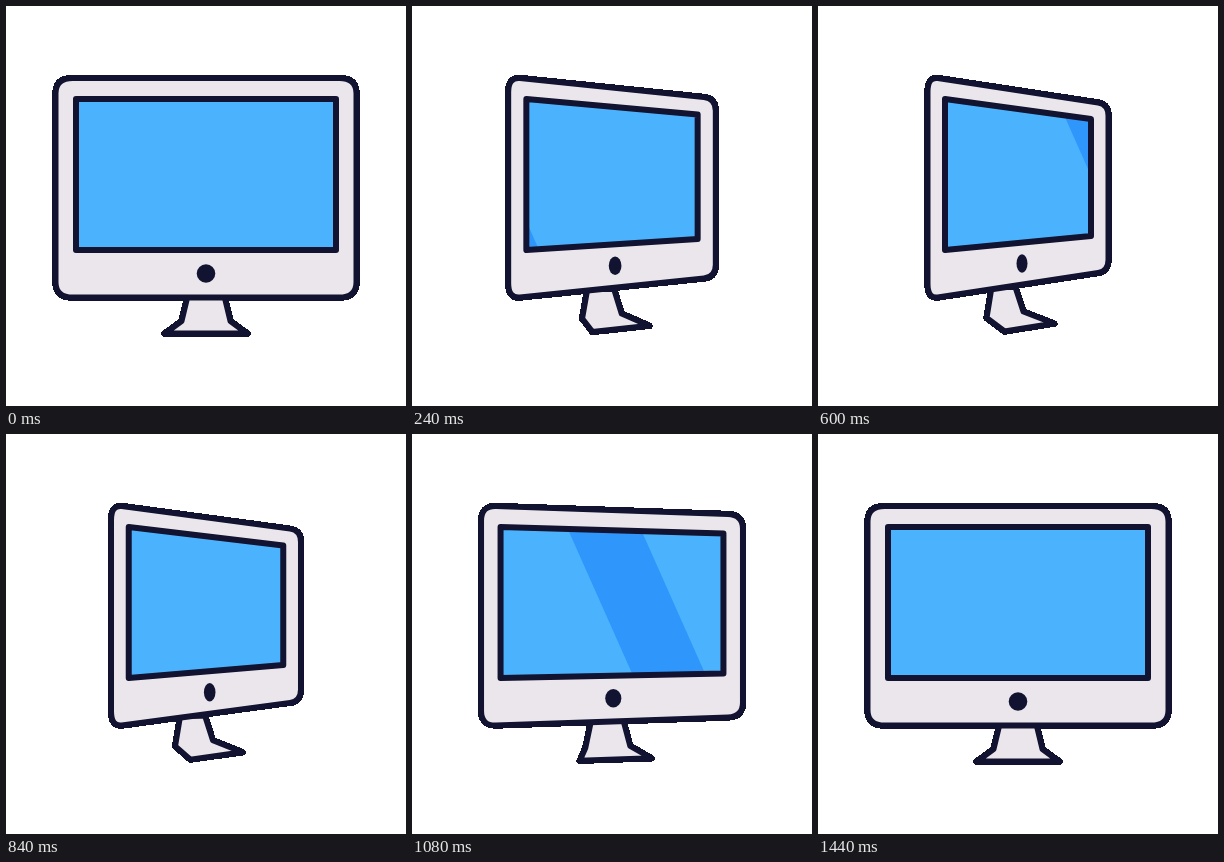
These frames come from a looping animation (400x400 px, 3.62 s). An HTML page:

```html
<!DOCTYPE html>
<html lang="en">
<head>
<meta charset="utf-8">
<title>Turning monitor</title>
<style>
  html, body { margin: 0; width: 100%; height: 100%; overflow: hidden; background: #fff; }
  svg { display: block; width: 100%; height: 100%; }
  .line { stroke: #121331; stroke-width: 6; stroke-linejoin: round; }
  .shell { fill: #ebe6ec; }
</style>
</head>
<body>
<svg viewBox="0 0 400 400">
  <!-- hard outer edge: alpha is either 0 or 1 -->
  <filter id="hard" filterUnits="userSpaceOnUse" width="400" height="400" color-interpolation-filters="sRGB">
    <feComponentTransfer><feFuncA type="discrete" tableValues="0 1 1 1"/></feComponentTransfer>
  </filter>
  <clipPath id="clip"><path id="mask"/></clipPath>
  <g filter="url(#hard)">
    <path id="stand" class="line shell"/>
    <path id="body" class="line shell"/>
    <path id="screen" fill="#4bb3fd"/>
    <g clip-path="url(#clip)"><path id="glare" fill="#2f97fc" d="M-8.9 80h73l80.1 180h-73z"/></g>
    <path id="frame" class="line" fill="none"/>
    <ellipse id="button" fill="#121331"/>
  </g>
</svg>
<script>
const LOOP = 3620, STEP = 30, TURN = 600, GLARE_START = 240;
const el = id => document.getElementById(id);
const mix = (a, b, p) => a + (b - a) * p;
const between = (a, b, f) => [mix(a[0], b[0], f), mix(a[1], b[1], f)];
const set = (id, attrs) => {
  for (const key in attrs) el(id).setAttribute(key, attrs[key]);
};
const polygon = points => "M" + points.join("L") + "Z";

// Corners of a panel whose right side shortens by the given tapers.
const panel = (left, top, bottom, topTaper, bottomTaper) => [
  [left, top], [400 - left, top + topTaper],
  [400 - left, bottom - bottomTaper], [left, bottom]];

// Rounds each corner by a fixed share of the edges that meet there.
function rounded(points) {
  const share = [0.07, 0.057];
  return points.map((pt, i) => {
    const from = between(pt, points[(i + 3) % 4], share[i % 2]);
    const to = between(pt, points[(i + 1) % 4], share[(i + 1) % 2]);
    return `${i ? "L" : "M"}${from}Q${pt} ${to}`;
  }).join("") + "Z";
}

// Each stand corner: x, y, and its shift at full turn.
const stand = [
  [181.5, 290, -8, -9], [175.5, 315, -7, -3], [158.5, 327.5, 28, -2],
  [241.5, 327.5, -5, -10], [224.5, 315, -19, -9.5], [218.5, 290, -21, -9]];

// Cubic Bezier easing (.33, 0, 0, 1)
function ease(t) {
  let lo = 0, hi = 1;
  for (let i = 0; i < 30; i++) {
    const s = (lo + hi) / 2;
    if (0.99 * s * (1 - s) ** 2 + s ** 3 < t) lo = s; else hi = s;
  }
  return lo * lo * (3 - 2 * lo);
}

function draw(t) {
  const p = ease(Math.max(0, 1 - Math.abs(t - TURN) / TURN));

  set("stand", { d: polygon(stand.map(([x, y, dx, dy]) => [x + dx * p, y + dy * p])) });
  set("body", { d: rounded(panel(49.5 + 60 * p, 72 - 1.5 * p, 291.5 + 1.5 * p, 27.5 * p, 27.5 * p)) });
  const face = polygon(panel(70 + 57 * p, 93, 244, 20 * p, 14 * p));
  for (const id of ["mask", "screen", "frame"]) set(id, { d: face });
  set("button", { cx: 200 + 4 * p, cy: 267.5 - 10 * p, rx: 9.3 - 3.8 * p, ry: 9.3 });

  // The glare crosses the screen twice.
  const g = t - GLARE_START;
  const visible = g >= 0 && g < 2 * TURN;
  set("glare", {
    visibility: visible ? "visible" : "hidden",
    transform: `translate(${-10 + g % TURN * 0.7} 0)`
  });
}

const start = performance.now();
function tick() {
  const t = (performance.now() - start) % LOOP;
  draw(Math.floor(t / STEP) * STEP);
  requestAnimationFrame(tick);
}
draw(0);
requestAnimationFrame(tick);
</script>
</body>
</html>
```
